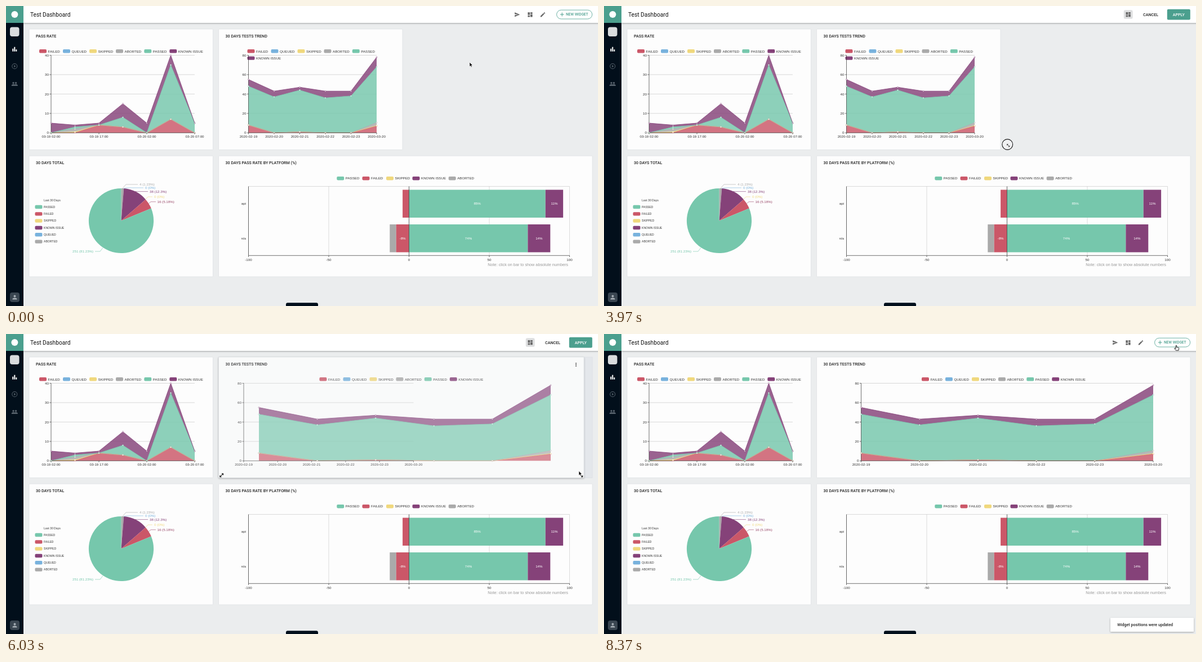
Write an HTML page that moves like this. It is 1051 by 533 pixels and loops after 8.41 s.

```html
<!DOCTYPE html>
<html lang="en">
<head>
<meta charset="utf-8">
<title>Dashboard</title>
<style>
  html, body { margin: 0; width: 100%; height: 100%; overflow: hidden; background: #ebedee; }
  svg { display: block; width: 100%; height: 100%; }
  text { font-family: "Liberation Sans", Arial, sans-serif; font-size: 6.2px; fill: #333; }
  .ui { font-family: Roboto, sans-serif; font-weight: 500; font-size: 7.15px; fill: #222; }
</style>
</head>
<body>
<svg id="stage" viewBox="0 0 1051 533" preserveAspectRatio="none">
  <defs>
    <filter id="soft" x="-10%" y="-20%" width="120%" height="150%">
      <feDropShadow dx="0" dy="1" stdDeviation="1.5" flood-color="#000" flood-opacity=".32"/>
    </filter>
  </defs>
  <g id="base"></g>
  <g id="trend"></g>
  <g id="top"></g>
  <g id="toast"></g>
  <g id="cursor"></g>
</svg>
<script>
const LOOP = 8410;
const EDIT_ON = 1250, PRESS = 3850, RELEASE = 5950, SETTLE = 6070, EDIT_OFF = 7800, TOAST = 7980;
const INK = '#020f1b', TEAL = '#4b9f8e';
const COLOR = {
  FAILED: '#cb5768', QUEUED: '#78b2dd', SKIPPED: '#f0d87d',
  ABORTED: '#aaaaaa', PASSED: '#76c7ac', 'KNOWN ISSUE': '#854279'
};
const ICON = {
  send: 'M2 21L23 12 2 3V10l15 2-15 2z',
  grid: 'M3 13h8V3H3zM3 21h8v-6H3zM13 21h8V11h-8zM13 3v6h8V3z',
  edit: 'M3 17.2V21h3.8L17.8 9.9l-3.7-3.7zM20.7 7c.4-.4.4-1 0-1.4l-2.3-2.3c-.4-.4-1-.4-1.4 0l-1.9 1.8 3.8 3.8z',
  bars: 'M4 10h4v10H4zM10 4h4v16h-4zM16 13h4v7h-4z',
  play: 'M10 16.5l6-4.5-6-4.5zM12 2a10 10 0 1 0 0 20a10 10 0 1 0 0-20zm0 18a8 8 0 1 1 0-16a8 8 0 1 1 0 16z',
  people: 'M16.5 13c-1.2 0-3.1.3-4.5 1-1.4-.7-3.3-1-4.5-1C5.3 13 1 14.1 1 16.3V19h22v-2.7C23 14.1 18.7 13 16.5 13zM7.5 12a3.5 3.5 0 1 0 0-7a3.5 3.5 0 1 0 0 7zM16.5 12a3.5 3.5 0 1 0 0-7a3.5 3.5 0 1 0 0 7z',
  person: 'M12 12a4 4 0 1 0 0-8a4 4 0 1 0 0 8zM12 14c-2.7 0-8 1.3-8 4v2h16v-2c0-2.7-5.3-4-8-4z'
};

const $ = id => document.getElementById(id);
const rect = (x, y, w, h, fill, more = '') =>
  `<rect x="${x}" y="${y}" width="${w}" height="${h}" fill="${fill}" ${more}/>`;
const text = (x, y, s, more = '') => `<text x="${x}" y="${y}" ${more}>${s}</text>`;
const fillText = color => `style="fill:${color}"`;
const line = (x1, y1, x2, y2, color = '#333', w = .7) =>
  `<path d="M${x1} ${y1}L${x2} ${y2}" stroke="${color}" stroke-width="${w}"/>`;
const icon = (name, cx, cy, size, fill) =>
  `<path transform="translate(${cx - size / 2} ${cy - size / 2}) scale(${size / 24})" d="${ICON[name]}" fill="${fill}"/>`;
const card = (x, y, right, bottom, title, fill = '#fdfdfd', more = '') =>
  rect(x, y, right - x, bottom - y, fill, `rx="1" stroke="#dcdee1" stroke-width=".7" ${more}`) +
  text(x + 12, y + 15.2, title, 'class="ui"');
const swatch = (x, y, name) => rect(x, y - 3.2, 13, 6.4, COLOR[name], 'rx="1.8"');

function legend(names, xs, y) {
  return names.map((n, i) => swatch(xs[i], y, n) + text(xs[i] + 15.5, y + 2.2, n)).join('');
}

// Legend of the area charts; the last entry wraps when there is no room
function areaLegend(x, wrap) {
  const xs = [0, 42, 89, 136, 186.3, 231.3].map(d => x + d);
  const names = Object.keys(COLOR);
  if (!wrap) return legend(names, xs, 80.3);
  return legend(names.slice(0, 5), xs, 80.3) + legend([names[5]], [x], 92.6);
}

const BASE = 225.3, HEIGHT = 137.8;

// layers: [name, stacked tops], from bottom to top
function areaChart({ max, axisX, axisStep, x, step, layers, labels, every }) {
  const count = layers[0][1].length;
  const end = axisX + axisStep * (count - 1);
  const py = v => BASE - v / max * HEIGHT;
  const at = (v, i) => `${(x + i * step).toFixed(2)} ${py(v).toFixed(2)}`;
  let out = '';
  for (let i = 0; i <= 4; i++) {
    const y = BASE - HEIGHT * i / 4;
    if (i) out += line(axisX, y, end, y, '#c9c9c9', .7);
    out += line(axisX - 2.6, y, axisX, y) + text(axisX - 4, y + 2.1, max / 4 * i, 'text-anchor="end"');
  }
  let under = Array(count).fill(0), strokes = '', dots = '';
  for (const [name, tops] of layers) {
    const upper = tops.map(at), lower = under.map(at).reverse();
    out += `<path d="M${upper.join('L')}L${lower.join('L')}Z" fill="${COLOR[name]}" fill-opacity=".82"/>`;
    strokes += `<path d="M${upper.join('L')}" fill="none" stroke="${COLOR[name]}" stroke-width=".8"/>`;
    tops.forEach((v, i) => {
      dots += `<circle cx="${x + i * step}" cy="${py(v)}" r="1.1" fill="#fff" stroke="${COLOR[name]}" stroke-width=".5"/>`;
    });
    under = tops;
  }
  out += strokes + line(axisX, BASE, end, BASE) + line(axisX, BASE - HEIGHT, axisX, BASE) + dots;
  for (let i = 0; i < count; i += every) {
    const tx = axisX + i * axisStep;
    out += line(tx, BASE, tx, BASE + 2.6) + text(tx, 234.3, labels[i / every], 'text-anchor="middle"');
  }
  return out;
}

function passRate() {
  return card(41, 41, 367.5, 255.5, 'PASS RATE') + areaLegend(59, false) + areaChart({
    max: 40, axisX: 80, axisStep: 42.5, x: 80, step: 42.5, every: 2,
    labels: ['03-19 02:00', '03-19 17:00', '03-20 02:00', '03-20 07:00'],
    layers: [
      ['FAILED', [0, 0, 4, 3, 0, 7, 0]],
      ['SKIPPED', [0, .5, 4, 3, 0, 7, 0]],
      ['ABORTED', [0, 2, 4, 3, 0, 7, 0]],
      ['PASSED', [0, 3, 4, 8, 0, 35, 5]],
      ['KNOWN ISSUE', [5, 4, 5, 15, 5, 40, 5]]
    ]
  });
}

function pie() {
  const cx = 204.5, cy = 381.5, r = 57.6, total = 309;
  let out = card(41, 266.2, 367.5, 481, '30 DAYS TOTAL');
  const small = 'style="font-size:5.1px"';
  out += text(67, 346.8, 'Last 30 Days', small);
  ['PASSED', 'FAILED', 'SKIPPED', 'KNOWN ISSUE', 'QUEUED', 'ABORTED'].forEach((n, i) => {
    const y = 357 + i * 12.33;
    out += swatch(51.5, y, n) + text(67, y + 1.8, n, small);
  });
  let sum = 0;
  const rim = n => {
    const a = n / total * 2 * Math.PI;
    return `${cx + r * Math.sin(a)} ${cy - r * Math.cos(a)}`;
  };
  for (const [name, n] of [['ABORTED', 4], ['KNOWN ISSUE', 38], ['FAILED', 16], ['PASSED', 251]]) {
    const big = n > total / 2 ? 1 : 0;
    out += `<path d="M${cx} ${cy}L${rim(sum)}A${r} ${r} 0 ${big} 1 ${rim(sum + n)}Z" fill="${COLOR[name]}"/>`;
    sum += n;
  }
  const tags = [
    ['4 (1.23%)', 237, 317, COLOR.ABORTED, 'M206.8 324L213 317H234'],
    ['0 (0%)', 247, 323, COLOR.QUEUED, 'M209 324L215 323H244'],
    ['38 (12.3%)', 255, 329.6, COLOR['KNOWN ISSUE'], 'M229 329.4L233 329.6H252'],
    ['0 (0%)', 263, 339, COLOR.SKIPPED, 'M247.7 343.5L252 339H260'],
    ['16 (5.18%)', 268.5, 347.8, '#984668', 'M253.5 351L257 347.8H266'],
    ['251 (81.23%)', 118, 436, COLOR.PASSED, 'M172 429.5L167 436H158']
  ];
  for (const [s, x, y, color, d] of tags) {
    out += `<path d="${d}" fill="none" stroke="${color}" stroke-width=".6"/>` + text(x, y + 2.1, s, fillText(color));
  }
  return out;
}

function platforms() {
  const px = v => 715.5 + v * 2.85;
  let out = card(377.5, 266.2, 1041, 481, '30 DAYS PASS RATE BY PLATFORM (%)');
  out += legend(['PASSED', 'FAILED', 'SKIPPED', 'KNOWN ISSUE', 'ABORTED'], [587.3, 632.5, 675, 721.5, 785.7], 306.2);
  out += line(430.5, 320.5, 1000.5, 320.5, '#ccc');
  for (let v = -100; v <= 100; v += 50) {
    out += line(px(v), 320.5, px(v), 443.3, '#ccc') + line(px(v), 443.3, px(v), 446);
    out += text(px(v), 452.8, v, 'text-anchor="middle"');
  }
  const white = 'text-anchor="middle" style="fill:#fff"';
  const row = (y, label, parts) => {
    out += text(426, y + 26.8, label, 'text-anchor="end"');
    for (const [name, from, to, s] of parts) {
      out += rect(px(from), y, (to - from) * 2.85, 49.5, COLOR[name]);
      if (s) out += text(px((from + to) / 2), y + 26.7, s, white);
    }
  };
  row(326.5, 'api', [['FAILED', -4, 0], ['PASSED', 0, 85, '85%'], ['KNOWN ISSUE', 85, 96, '11%']]);
  row(388, 'n/a', [['ABORTED', -12, -8], ['FAILED', -8, 0, '-8%'], ['PASSED', 0, 74, '74%'], ['KNOWN ISSUE', 74, 88, '14%']]);
  out += line(px(0), 320.5, px(0), 443.3) + line(430.5, 320.5, 430.5, 443.3) + line(430.5, 443.3, 1000.5, 443.3);
  return out + text(998, 462, 'Note: click on bar to show absolute numbers', 'text-anchor="end" style="font-size:7.25px;fill:#999"');
}

function sidebar() {
  return rect(0, 0, 31, 533, INK) + rect(0, 0, 31, 30, TEAL) +
    '<circle cx="15.4" cy="15" r="6" fill="#fff"/>' +
    rect(7, 37.5, 16.5, 16.5, '#d9dcde', 'rx="4"') +
    icon('bars', 15.3, 76.8, 12, '#fff') + icon('play', 15.3, 107, 12, '#56616b') + icon('people', 15.3, 138.5, 12, '#56616b') +
    rect(7, 509, 17, 17, '#3a4651', 'rx="4"') + icon('person', 15.5, 517.5, 12, '#a5adb4');
}

function header(edit, hot) {
  let out = rect(31, -4, 1024, 34, '#fff', 'filter="url(#soft)"') + sidebar();
  out += text(43, 18.8, 'Test Dashboard', 'class="ui" style="font-size:10.2px;font-weight:400;fill:#111"');
  if (edit) {
    return out + rect(922.8, 7.3, 15.8, 15.4, '#dedfe0', 'rx="2.5"') +
      icon('grid', 930.7, 15, 11, hot ? '#161616' : '#666') +
      text(957, 17.6, 'CANCEL', 'class="ui"') +
      rect(999.8, 5.8, 41, 18.6, TEAL, 'rx="2"') +
      text(1020.2, 17.6, 'APPLY', 'class="ui" text-anchor="middle" style="fill:#fff"');
  }
  return out + icon('send', 907.5, 15.3, 10.5, '#666') +
    icon('grid', 930.5, 15.3, 11, hot ? '#161616' : '#666') + icon('edit', 953, 15.3, 11, '#666') +
    rect(977.6, 7.2, 63, 15.8, '#fff', `rx="7.9" stroke="${TEAL}" stroke-width=".8"`) +
    line(983.8, 15, 990.6, 15, TEAL, 1) + line(987.2, 11.6, 987.2, 18.4, TEAL, 1) +
    text(994, 17.4, 'NEW WIDGET', `class="ui" style="font-size:6.5px;fill:${TEAL}"`);
}

// Double-headed diagonal arrow; dir is 1 for "\" and -1 for "/"
const diagonal = (x, y, dir, s = 1) =>
  `<path transform="translate(${x} ${y}) scale(${dir * s} ${s})" d="M-2.7 -2.7L2.7 2.7M-2.9 -.2V-2.9H-.2M2.9 .2V2.9H.2" fill="none" stroke="#222" stroke-width="1.1"/>`;

const smooth = p => p * p * (3 - 2 * p);

// Interpolates rows of [time, ...values]
function track(keys, t, ease = p => p) {
  let i = keys.findIndex(k => k[0] > t);
  if (i === 0) return keys[0].slice(1);
  if (i < 0) return keys[keys.length - 1].slice(1);
  const a = keys[i - 1], b = keys[i], p = ease((t - a[0]) / (b[0] - a[0]));
  return a.slice(1).map((v, j) => v + (b[j + 1] - v) * p);
}

const MOVES = [
  [250, 823, 100], [1050, 931, 18.5], [1800, 931, 18.5], [3350, 699, 250], [PRESS, 699, 250],
  [5500, 1017, 243.5], [6350, 1017, 243.5], [7400, 1016, 26], [7600, 1016, 20.5]
];
const DRAG = [[PRESS, 699, 250], [3970, 716, 246], [4670, 895, 245], [5100, 975, 244], [5500, 1017, 243.5]];
// right edge, axis start and step, area start and step
const RESIZE = [
  [3990, 704, 430.5, 45.5, 430.5, 45.5],
  [4300, 738, 413, 45.6, 422, 48],
  [4670, 802, 413, 45.6, 426, 58.8],
  [5500, 1008, 419, 56, 445, 99],
  [5850, 1026, 422, 60.3, 449, 103.6],
  [SETTLE, 1026, 422, 60.3, 449, 103.6],
  [6320, 1041, 456.5, 103.7, 456.5, 103.7]
];
const DATES = ['2020-02-19', '2020-02-20', '2020-02-21', '2020-02-22', '2020-02-23', '2020-03-20'];
const TREND = [
  ['FAILED', [8, 0, 1, 0, 0, 7]],
  ['SKIPPED', [8, 0, 1, 0, 0, 7.5]],
  ['ABORTED', [8, 0, 1, 0, 0, 10.5]],
  ['PASSED', [48, 37, 44, 36, 38, 68]],
  ['KNOWN ISSUE', [55, 43, 47, 43, 43, 78]]
];

function trend(t, mx, my) {
  const [right, axisX, axisStep, x, step] = track(RESIZE, t);
  const lifted = t > 4000 && t < SETTLE;
  const hover = t > EDIT_ON && t < EDIT_OFF && (lifted || (mx > 377 && mx < right && my > 41 && my < 256));
  let out = '';
  if (lifted) {
    const slot = 704 + Math.round((right - 704) / 84.25) * 84.25;
    out += rect(377.5, 41, slot - 377.5, 214.5, '#e4e7eb', 'stroke="#d9dde3" stroke-width=".7"');
  }
  out += `<g ${lifted ? 'opacity=".88"' : ''}>`;
  out += card(377.5, 41, right, 255.5, '30 DAYS TESTS TREND', '#fdfdfd', lifted ? 'filter="url(#soft)"' : '');
  const wrap = right < 712;
  out += `<g ${lifted ? 'opacity=".9"' : ''}>` + areaLegend(wrap ? 428.5 : (377.5 + right) / 2 - 145.3, wrap);
  out += areaChart({ max: 80, axisX, axisStep, x, step, every: 1, labels: DATES, layers: TREND }) + '</g></g>';
  if (hover) {
    for (const dy of [-2.6, 0, 2.6]) out += `<circle cx="${right - 14}" cy="${54.5 + dy}" r=".95" fill="#444"/>`;
    out += diagonal(382.7, 251, -1) + diagonal(right - 5.2, 251, 1);
  }
  return out;
}

function pointer(t, x, y) {
  if (t >= PRESS && t < RELEASE) {
    return `<circle cx="${x}" cy="${y}" r="9.4" fill="#fff" fill-opacity=".25" stroke="#1a1a1a" stroke-width="1.1"/>` +
      diagonal(x + 1.5, y + 1.8, 1, .75);
  }
  const hand = (t > 950 && t < 1900) || (t > 7470 && y < 25);
  const d = hand
    ? 'M-.8 .2Q0 -.6 .8 .2V3L3.6 3.6Q4.8 4 4.7 5.2L4 8.6H-.6L-3.2 5.4Q-3.4 4.2 -2 4.5L-.8 5.4Z'
    : 'M0 0V7.6L1.8 6L3 8.7L4.3 8.1L3.1 5.5H5.5Z';
  const paint = hand ? 'fill="#fff" stroke="#111" stroke-width=".9"' : 'fill="#000" stroke="#fff" stroke-width=".6"';
  return `<path transform="translate(${x} ${y})" d="${d}" ${paint} stroke-linejoin="round"/>`;
}

function toast(t) {
  if (t < TOAST) return '';
  const p = smooth(Math.min(1, (t - TOAST) / 180));
  return `<g transform="translate(0 ${(1 - p) * 32})" opacity="${p}">` +
    rect(899, 504.3, 148, 24.6, '#fff', 'rx="1" filter="url(#soft)"') +
    text(911.3, 519.3, 'Widget positions were updated', 'class="ui"') + '</g>';
}

function render(t) {
  const dragging = t >= PRESS && t < 5500;
  const [x, y] = dragging ? track(DRAG, t) : track(MOVES, t, smooth);
  const onGrid = x > 922 && x < 939 && y < 24;
  $('trend').innerHTML = trend(t, x, y);
  $('top').innerHTML = header(t >= EDIT_ON && t < EDIT_OFF, onGrid);
  $('toast').innerHTML = toast(t);
  $('cursor').innerHTML = pointer(t, x, y);
}

$('base').innerHTML = rect(0, 0, 1051, 533, '#ebedee') + passRate() + pie() + platforms() +
  rect(497, 527.3, 57, 12, INK, 'rx="3"');

function tick() {
  render(performance.now() % LOOP);
  requestAnimationFrame(tick);
}
tick();
</script>
</body>
</html>
```
